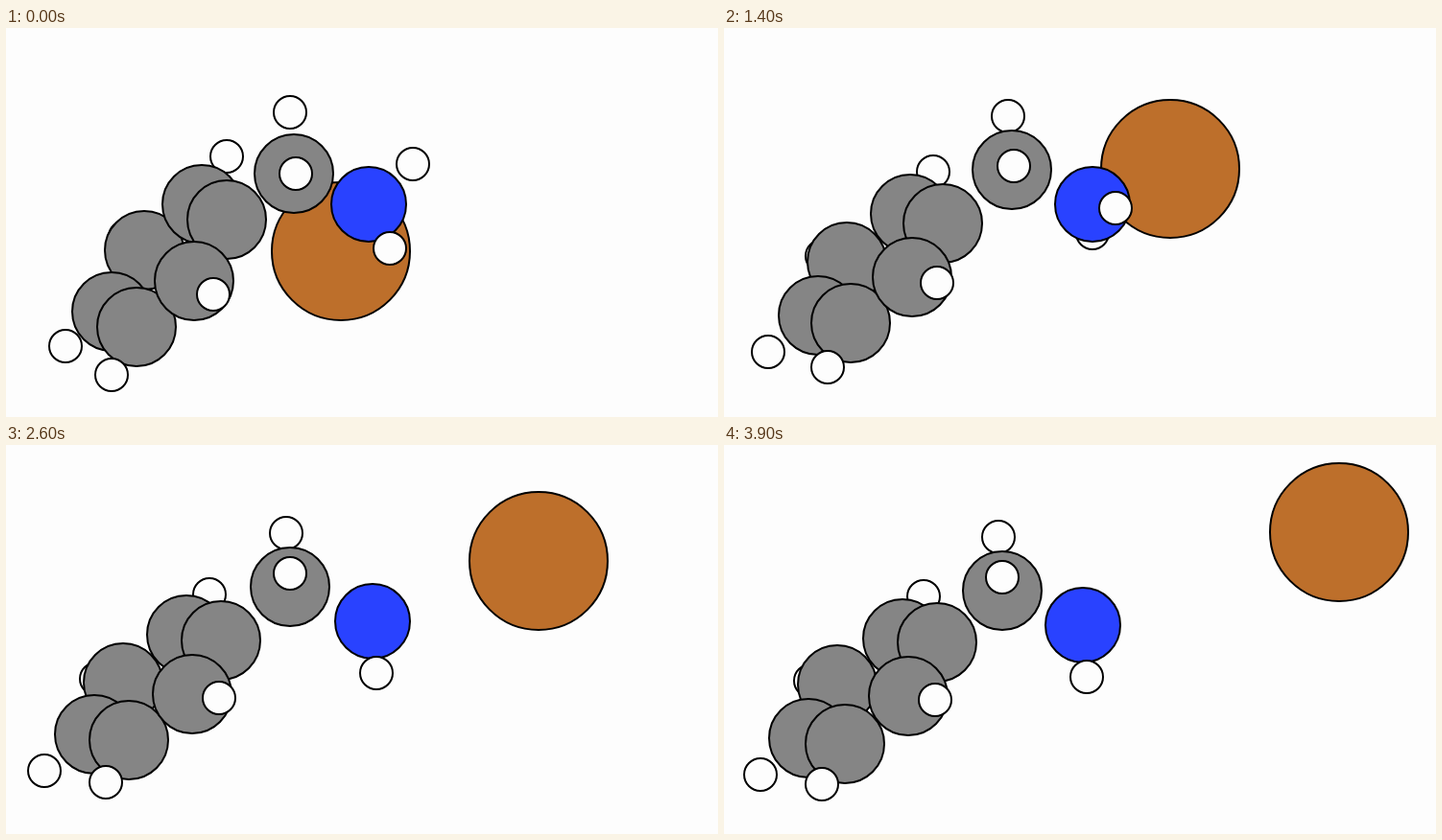
An HTML page with a canvas for the animation above (4 s loop, 742 by 406 pixels).

```html
<!DOCTYPE html>
<html lang="en">
<head>
<meta charset="utf-8">
<title>Molecule losing an atom</title>
<style>
  html, body { margin: 0; width: 100%; height: 100%; overflow: hidden; background: #fdfdfd; }
  canvas { display: block; }
</style>
</head>
<body>
<canvas id="stage" width="742" height="406"></canvas>
<script>
const ctx = document.getElementById('stage').getContext('2d');
const LOOP = 4000, STEP = 100, SETTLED = 1800, LAST = 3900;
const PAPER = '#fdfdfd';

const clamp = k => Math.min(1, Math.max(0, k));
const mix = (a, b, k) => a.map((v, i) => v + (b[i] - v) * k);
const add = (a, b, k = 1) => a.map((v, i) => v + b[i] * k);

// Atoms sit on a two-pixel grid.
function disc(radius, fill, centre) {
  const [x, y] = centre.map(v => 2 * Math.round((v - radius - 1) / 2) + 1 + radius);
  ctx.beginPath();
  ctx.arc(x, y, radius, 0, 2 * Math.PI);
  ctx.fillStyle = fill;
  ctx.fill();
  ctx.stroke();
}
const carbon = p => disc(41, '#858585', p);
const hydrogen = p => disc(17, PAPER, p);
const nitrogen = p => disc(39, '#2942ff', p);
const leaving = p => disc(72, '#bd6f2b', p);

// A tilted regular hexagon, drawn back to front; the 60° corner holds the side chain.
function ring(centre, u, v) {
  for (const degrees of [300, 0, 240, 60, 180, 120]) {
    const angle = degrees * Math.PI / 180;
    const spoke = add(u.map(c => c * Math.cos(angle)), v, Math.sin(angle));
    const inFront = Math.cos(angle - 2 * Math.PI / 3) > 0;
    const bonded = () => degrees !== 60 && hydrogen(add(centre, spoke, 1.78));
    if (!inFront) bonded();
    carbon(add(centre, spoke));
    if (inFront) bonded();
  }
}

function draw(t) {
  const turn = clamp(t / SETTLED);
  const late = clamp((t - SETTLED) / (LAST - SETTLED));
  const swing = turn ** 3;
  const bulge = Math.sin(Math.PI * turn) ** 2;

  // Turn into place, then drift left, faster further from the ring.
  const move = (from, to, k = turn) => {
    const p = mix(from, to, k);
    return add(p, [-p[0] / 32 * late, 3 * late ** 2]);
  };

  leaving(add(
    add(mix([349, 233], [501, 127], turn), [-5, -9], bulge),
    [140 * late, -36 * late ** 2]));

  hydrogen(move([296, 88], [296, 92]));
  carbon(move([300, 151], [300, 148]));
  hydrogen(move([302, 152], [300, 134], swing));

  ring(move([170, 248], [160, 253]),
    mix([34, -64], [30, -55], turn),
    mix([50, -18], [59, -25], turn));

  // The lower hydrogen dips and passes behind the nitrogen.
  const amine = [
    () => nitrogen(move([378, 184], [386, 184])),
    () => hydrogen(add(move([400, 230], [384, 186]), [-10, 44], bulge))
  ];
  if (t >= 1000) amine.reverse();
  amine.forEach(paint => paint());
  hydrogen(move([424, 142], [390, 238], swing));
}

function frame() {
  ctx.fillStyle = PAPER;
  ctx.fillRect(0, 0, 742, 406);
  ctx.lineWidth = 2;
  ctx.strokeStyle = '#000';
  draw(Math.floor(performance.now() % LOOP / STEP) * STEP);
  requestAnimationFrame(frame);
}
frame();
</script>
</body>
</html>
```
